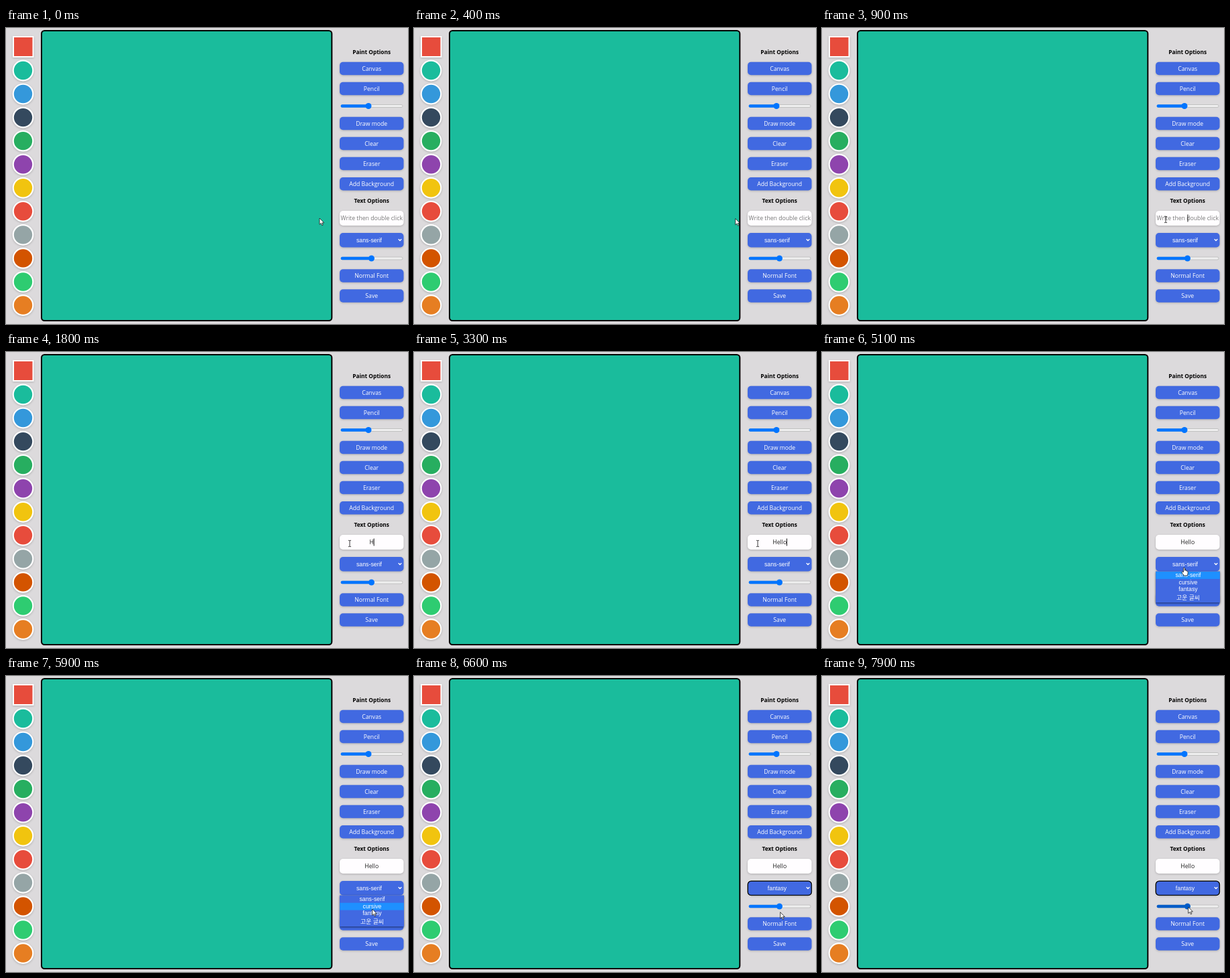
Animation of 600 by 442 pixels, one loop 8 s. Source, as an HTML page:

```html
<!DOCTYPE html>
<html lang="en">
<head>
<meta charset="utf-8">
<title>Paint board</title>
<style>
  html, body { margin: 0; width: 100%; height: 100%; overflow: hidden; background: #dcdadc; }
  svg { display: block; width: 100%; height: 100%; }
  text { text-anchor: middle; font: 8.7px "Open Sans", "Noto Sans", sans-serif; fill: #fff; white-space: pre; }
  .title { font-size: 8.35px; font-weight: 700; fill: #000; }
  .plain { font: 8.8px "Liberation Sans", "Noto Sans CJK KR", "Noto Sans CJK", sans-serif; }
  .shadow { filter: drop-shadow(0 1.5px 1.5px rgba(0, 0, 0, .2)); }
  .blue { fill: #4169e1; }
  .popup { filter: drop-shadow(0 1px 1.5px rgba(0, 0, 0, .55)); }
</style>
</head>
<body>
<svg id="stage" viewBox="0 0 600 442"></svg>
<script>
const LOOP = 8000, TICK = 100, MID = 545.7;
const stage = document.getElementById('stage');

const label = (text, y, attrs = '', x = MID) => `<text x="${x}" y="${y}" ${attrs}>${text}</text>`;
const box = (y, h, cls) => `<rect class="${cls}" x="498" y="${y}" width="95.5" height="${h}" rx="5"/>`;
const button = (text, y) => box(y - 9.7, 19.4, 'blue shadow') + label(text, y + 3.1);

const slider = (x, y, id) => `<g id="${id}">
  <rect x="500" y="${y - 2}" width="92" height="4" rx="2" fill="#efefef" stroke="#b2b2b2" stroke-width=".7"/>
  <g class="accent" fill="#0075ff">
    <rect x="499.6" y="${y - 2.3}" width="${x - 499.6}" height="4.6" rx="2.3"/>
    <circle cx="${x}" cy="${y}" r="4.5"/>
  </g></g>`;

const swatches = ['#1abc9c', '#3498db', '#34495e', '#27ae60', '#8e44ad', '#f1c40f',
  '#e74c3c', '#95a5a6', '#d35400', '#2ecc71', '#e67e22'];
const swatch = (color, i) =>
  `<circle cx="25.5" cy="${63.5 + 35.05 * i}" r="14.8" fill="${color}" stroke="#fff" stroke-width="2.2"/>`;

const options = [['sans-serif', 336], ['cursive', 346.6], ['fantasy', 357.4], ['고운 글씨', 370]];

const pointers = {
  arrow: `<path d="M0 0V9.4L2.2 7.4L3.7 10.8L5.2 10.1L3.8 6.9H6.7Z" fill="#fff" stroke="#111" stroke-width=".75"/>`,
  text: `<path d="M-2-4.6H-.6L0-4L.6-4.6H2M0-4V4M-2 4.6H-.6L0 4L.6 4.6H2" fill="none" stroke="#222" stroke-width=".9"/>`,
  hand: `<path d="M-1 6.8V1Q-1 0 0 0T1 1V4.4Q2-.0 2.7 4.7Q3.8 4.2 4.2 5.3Q5.5 4.9 5.6 6.4V8.6Q5.4 10 4.6 12H-.4Q-1.2 10-3.2 7.8Q-3.8 6.6-2.8 6.1Q-1.8 5.8-1 6.8Z" fill="#fff" stroke="#111" stroke-width=".75"/>`
};

stage.innerHTML = `
  <g class="shadow">
    <rect x="11" y="13" width="29.5" height="30" fill="#e74c3c" stroke="#fff" stroke-width="2"/>
    ${swatches.map(swatch).join('')}
  </g>
  <rect x="53" y="4" width="433.3" height="433" rx="4.5" fill="#1abc9c" stroke="#000" stroke-width="2"/>
  ${label('Paint Options', 38.7, 'class="title"')}
  ${button('Canvas', 60.5)}${button('Pencil', 90.5)}
  ${slider(541, 116.5, 'size')}
  ${button('Draw mode', 142.5)}${button('Clear', 172.5)}${button('Eraser', 202.5)}${button('Add Background', 232.7)}
  ${label('Text Options', 261, 'class="title"')}
  <g fill="#fffdff">${box(273, 22, 'shadow')}</g>
  ${label('', 287.4, 'id="field"')}
  <rect id="caret" y="278.5" width=".9" height="11" fill="#000"/>
  ${box(306, 21.5, 'blue shadow')}
  <g id="ring" fill="none">
    <rect x="497" y="305" width="97.6" height="23.5" rx="6" stroke="#fff" stroke-width=".8"/>
    <rect x="498.2" y="306.2" width="95.2" height="21.2" rx="5" stroke="#101010" stroke-width="1.5"/>
  </g>
  ${label('', 319.6, 'id="choice" class="plain"', 542)}
  <path d="M585.7 315.2l2.3 2.3l2.3-2.3" fill="none" stroke="#fff" stroke-width="1.3"/>
  ${slider(545.5, 344, 'fontSize')}
  ${button('Normal Font', 370)}${button('Save', 400)}
  <g id="popup">
    <rect class="blue popup" x="498" y="327.5" width="96" height="46.5"/>
    <rect id="row" x="498.3" width="95.4" height="10.9" fill="#1e90ff"/>
    ${options.map(([name, y]) => label(name, y, 'class="plain"', 546.5)).join('')}
  </g>
  <g id="pointer">${Object.entries(pointers).map(([k, p]) => `<g data-kind="${k}">${p}</g>`).join('')}</g>`;

const part = id => document.getElementById(id);
const show = (el, on) => { el.style.display = on ? '' : 'none'; };
const lastStep = (steps, t) => steps.filter(s => s[0] <= t).pop();

const path = [[0, 468, 284], [200, 468, 284], [800, 513, 286], [4100, 513, 286], [4500, 540.5, 322],
  [5400, 540.5, 322], [5900, 546.7, 348], [6100, 546.7, 352.7], [7100, 546.7, 352.7],
  [7400, 547, 358], [7900, 546.7, 345]];
const kinds = [[0, 'arrow'], [600, 'text'], [4300, 'arrow'], [4400, 'hand'], [5500, 'arrow']];
const typing = [[0, ''], [1800, 'H'], [2200, 'He'], [2600, 'Hel'], [2700, 'Hell'], [3300, 'Hello']];
const FOCUS = 900, OPEN = 4900, CLOSE = 6600;

function pointerAt(t) {
  const next = path.findIndex(p => p[0] > t);
  if (next < 0) return path[path.length - 1].slice(1);
  const [t0, x0, y0] = path[next - 1], [t1, x1, y1] = path[next];
  const u = (t - t0) / (t1 - t0), e = u * u * (3 - 2 * u);
  return [x0 + (x1 - x0) * e, y0 + (y1 - y0) * e];
}

function render(t) {
  const [x, y] = pointerAt(t);
  const kind = lastStep(kinds, t)[1];
  part('pointer').setAttribute('transform', `translate(${x} ${y})`);
  for (const el of part('pointer').children) show(el, el.dataset.kind === kind);

  const [typedAt, typed] = lastStep(typing, t);
  const field = part('field');
  field.textContent = typed || 'Write then double click';
  field.style.fill = typed ? '#222' : '#777';
  const half = typed ? field.getComputedTextLength() / 2 : 0;
  part('caret').setAttribute('x', MID + half - .2);
  // The blink restarts with focus and with every key.
  const blinkOn = Math.floor((t - Math.max(FOCUS, typedAt)) / 500) % 2 === 0;
  const typingNow = typed && typed !== 'Hello';
  show(part('caret'), t >= FOCUS && t < OPEN && (blinkOn || typingNow));

  const open = t >= OPEN && t < CLOSE;
  show(part('popup'), open);
  part('row').setAttribute('y', 328 + 10.7 * (y < 338.5 ? 0 : y < 349.5 ? 1 : 2));
  show(part('ring'), t >= CLOSE);
  part('choice').textContent = t >= CLOSE ? 'fantasy' : 'sans-serif';

  const hover = t > 7200 && y < 349;
  part('fontSize').querySelector('.accent').setAttribute('fill', hover ? '#005cc8' : '#0075ff');
}

const start = performance.now();
function loop(now) {
  const t = Math.max(0, now - start) % LOOP;
  render(Math.floor(t / TICK) * TICK);
  requestAnimationFrame(loop);
}
render(0);
requestAnimationFrame(loop);
</script>
</body>
</html>
```
